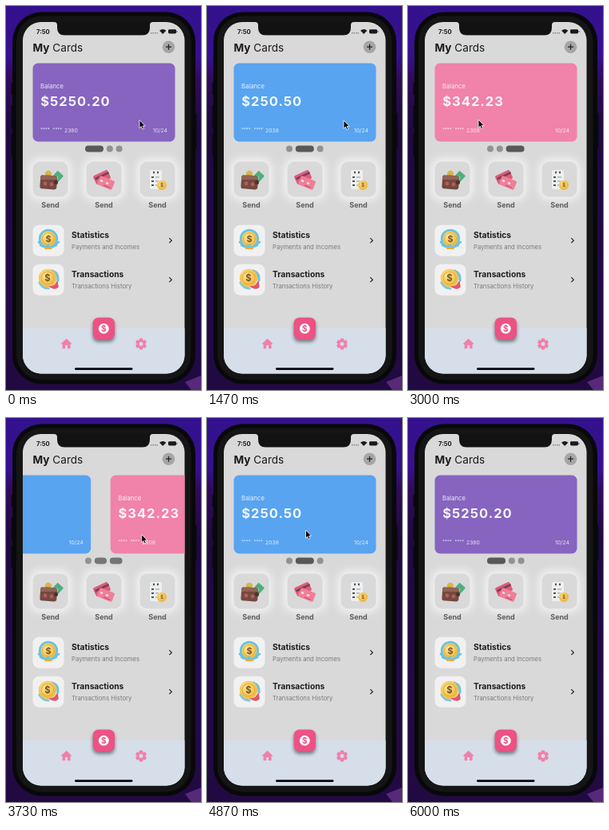
These frames come from a looping animation (244x480 px, 6.34 s). An HTML page:

```html
<!DOCTYPE html>
<html lang="en">
<head>
<meta charset="utf-8">
<title>My Cards</title>
<style>
  html, body { margin: 0; width: 100%; height: 100%; overflow: hidden; background: #1f0a42; }
  svg { display: block; width: 100vw; height: 100vh; font-family: Inter, "Open Sans", sans-serif; }
  .b { font-weight: 700; }
  .sub { font-size: 7.75px; fill: #7b7b7d; }
  .item { font-size: 10.25px; font-weight: 700; fill: #1c1c1e; }
  .send { font-size: 9px; font-weight: 700; fill: #5f5f61; text-anchor: middle; }
  .card { fill: #fff; }
  .small { font-size: 6.8px; fill-opacity: .8; }
  .stars { font-size: 5.8px; }
  .sum { font-size: 16.5px; font-weight: 700; letter-spacing: 1px; fill-opacity: .93; }
</style>
</head>
<body>
<svg viewBox="0 0 244 480" preserveAspectRatio="none">
  <defs>
    <linearGradient id="wall" x2="0" y2="1">
      <stop offset="0" stop-color="#33118c"/><stop offset=".13" stop-color="#361090"/>
      <stop offset=".19" stop-color="#300b5a"/><stop offset=".32" stop-color="#1e0a40"/>
      <stop offset=".7" stop-color="#230a46"/><stop offset="1" stop-color="#210a42"/>
    </linearGradient>
    <radialGradient id="gold" cx=".4" cy=".35">
      <stop offset="0" stop-color="#fde695"/><stop offset="1" stop-color="#f1c04a"/>
    </radialGradient>
    <filter id="glow" x="-50%" y="-50%" width="200%" height="200%"><feGaussianBlur stdDeviation="5.5"/></filter>
    <filter id="soft" x="-50%" y="-50%" width="200%" height="200%"><feGaussianBlur stdDeviation="2"/></filter>
    <clipPath id="screen"><rect x="21" y="20" width="202.5" height="439.5" rx="23"/></clipPath>
    <g id="coin">
      <circle r="10" fill="url(#gold)"/>
      <circle r="7" fill="none" stroke="#e5ae3c" stroke-width=".9"/>
      <text class="b" y="3.6" font-size="10" text-anchor="middle" fill="#7a5428" stroke="none">$</text>
    </g>
  </defs>

  <rect width="244" height="480" fill="url(#wall)"/>
  <path d="M224 470L244 462V480H232z" fill="#58297a"/>
  <path d="M7.5 96v15M7.5 124v28M7.5 160v28M237.5 134v44" stroke="#0b0a10" stroke-width="2"/>
  <rect x="8" y="7.5" width="229" height="465" rx="37" fill="#08080a"/>
  <rect x="13" y="12.5" width="218.5" height="455" rx="32" fill="#151516"/>

  <g clip-path="url(#screen)">
    <rect x="21" y="20" width="203" height="441" fill="#d9d9da"/>

    <text x="33.5" y="56.5" font-size="13.6" fill="#1a1a1c"><tspan class="b">My</tspan> Cards</text>
    <circle cx="203.5" cy="51.2" r="7.8" fill="#a6a6a8"/>
    <path d="M200 51.2h7M203.5 47.7v7" stroke="#222" stroke-width="1.3"/>

    <g id="tiles"></g>
    <g id="cards"></g>
    <g id="dots"></g>

    <g transform="translate(55 217)">
      <rect x="-5" y="-8" width="10" height="15" rx="1" fill="#4fae80" transform="translate(8 -2) rotate(42)"/>
      <circle cx="8" cy="-2" r="2.4" fill="#8fd0a8"/>
      <circle cx="-2" cy="-7" r="4.2" fill="#d9b545"/>
      <rect x="-12" y="-5" width="21" height="17" rx="3" fill="#744a40" transform="rotate(4)"/>
      <path d="M-12-4Q-2-8 9-3v3H-12z" fill="#936456"/>
      <circle cx="-6" cy="5" r="2.4" fill="#b55d59"/>
      <circle cx="2" cy="6" r="2.4" fill="#b55d59"/>
      <rect x="5" y="1" width="5" height="5" rx="2" fill="#4f322c"/>
    </g>
    <g transform="translate(122 217)">
      <rect x="-10" y="-6" width="20" height="12" rx="2" fill="#de5c7c" transform="translate(-2 -3) rotate(-25)"/>
      <path d="M-11-2L6-10l1.2 2.6L-9.8.6z" fill="#7d4152"/>
      <rect x="-10" y="-6" width="20" height="12" rx="2" fill="#ee7f99" transform="translate(3 4) rotate(22)"/>
      <path d="M-4 1l3 1.2M3 4l3 1.2" stroke="#fbe3e8" stroke-width="2.4"/>
      <path d="M0 7l8 3.2" stroke="#c94b6c" stroke-width="1.2"/>
    </g>
    <g transform="translate(189 217)">
      <rect x="-9" y="-12" width="15" height="24" rx="2" fill="#eeeff0"/>
      <path d="M-5-9h2m3 0h2" stroke="#4b5258" stroke-width="2.6"/>
      <path d="M-7-3h3m-3 5h3m-3 5h3" stroke="#4a5a60" stroke-width="2.2"/>
      <path d="M-2-3h5m-5 5h4m-4 5h2" stroke="#8d959b" stroke-width="1.2"/>
      <use href="#coin" transform="translate(6 7) scale(.62)"/>
    </g>

    <rect x="33.5" y="273.7" width="39" height="39" rx="8" fill="#f1f1f2"/>
    <rect x="33.5" y="322.7" width="39" height="39" rx="8" fill="#f1f1f2"/>
    <g transform="translate(53 292)" fill="none" stroke="#6cc3e0" stroke-width="2.6" stroke-linecap="round">
      <path d="M-12 3l4 4M9 6l4-3"/>
      <use href="#coin" transform="translate(0 -1) scale(1.08)"/>
      <path d="M-10 7Q-4 11 0 7M5 9l5-2"/>
      <path d="M-4 11h8" stroke="#e8ae45" stroke-width="2"/>
    </g>
    <g transform="translate(53 341)" fill="none" stroke-width="3.2" stroke-linecap="round">
      <path d="M5-10Q13-7 12 2" stroke="#74bfe3"/>
      <path d="M-11 5Q-7 12 0 12" stroke="#7cc8e2"/>
      <use href="#coin" transform="translate(-1 -1) scale(1.12)"/>
      <path d="M2 10Q10 9 11 3L12 10Q8 14 2 10z" fill="#e0576a" stroke="#e0576a" stroke-width="1.5"/>
    </g>
    <text class="item" x="82" y="290.2">Statistics</text>
    <text class="sub" x="82" y="303.7">Payments and Incomes</text>
    <text class="item" x="82" y="339.2">Transactions</text>
    <text class="sub" x="82" y="352.7">Transactions History</text>
    <path d="M204.3 290.2l3 3-3 3M204.3 339.2l3 3-3 3" fill="none" stroke="#222" stroke-width="1.2"/>

    <rect x="21" y="403" width="203" height="58" fill="#d6deea"/>
    <rect x="108.5" y="392" width="27.5" height="28" rx="7" fill="#000" opacity=".45" filter="url(#soft)"/>
    <rect x="108.7" y="389.5" width="27.3" height="27.3" rx="7" fill="#ec5284"/>
    <circle cx="122.3" cy="403.2" r="6.4" fill="#fff"/>
    <text class="b" x="122.3" y="406.9" font-size="10" text-anchor="middle" fill="#ec5284">$</text>
    <path d="M75.6 415.8l7.2 6.6h-2.2v5.9h-3.6v-4.4h-2.8v4.4h-3.6v-5.9h-2.2z" fill="#f080aa"/>
    <g id="gear" transform="translate(169 422.5)" fill="#f080aa"></g>
    <rect x="86" y="452.3" width="72.5" height="2.6" rx="1.3" fill="#08080a"/>

    <path d="M60 19V20Q64 20 64 24V27Q64 36.5 73 36.5H171Q180 36.5 180 27V24Q180 20 184 20V19z" fill="#121213"/>
    <text class="b" x="38" y="34.8" font-size="7.7" fill="#1a1a1c">7:50</text>
    <path d="M181 33.8h9" stroke="#8a8a8c" stroke-width="1.4" stroke-dasharray="1.5 1"/>
    <path d="M192 30.8Q196.2 27.3 200.4 30.8L196.2 35z" fill="#1a1a1c"/>
    <rect x="203" y="29.3" width="10" height="5.2" rx="1.4" fill="#1a1a1c"/>
    <rect x="213.5" y="31" width="1" height="2" fill="#555"/>
  </g>
  <path id="pointer" d="M0 0V10.2L2.3 8.1 3.8 11.6 5.6 10.8 4.1 7.4H7.2z" fill="#000" stroke="#fff" stroke-width=".8" stroke-linejoin="round"/>
</svg>

<script>
const LOOP = 6340, FRAME = 1000 / 15, PITCH = 202.5;
const $ = id => document.getElementById(id);

const accounts = [
  { color: '#8664c0', sum: '$5250.20', last: '2380' },
  { color: '#58a4f1', sum: '$250.50', last: '2038' },
  { color: '#f182a9', sum: '$342.23', last: '2308' }
];

$('cards').innerHTML = accounts.map((a, i) => `
  <g class="card" transform="translate(${i * PITCH})">
    <rect x="33.5" y="71.5" width="178" height="98" rx="6.5" fill="${a.color}"/>
    <text x="43" y="102.7" font-size="7.7" fill-opacity=".85">Balance</text>
    <text class="sum" x="43.3" y="124.7">${a.sum}</text>
    <g class="small">
      <text class="stars" x="43" y="157.4">****</text>
      <text class="stars" x="58.5" y="157.4">****</text>
      <text x="73" y="158">${a.last}</text>
      <text x="202" y="158" text-anchor="end">10/24</text>
    </g>
  </g>`).join('');

const tileXs = [33.5, 100.5, 167.5];
const tile = (x, extra) => `<rect x="${x}" y="194.5" width="44" height="44" rx="9" ${extra}/>`;
$('tiles').innerHTML =
  tileXs.map(x => `<rect x="${x - 4}" y="190.5" width="52" height="52" rx="13" fill="#fff" opacity=".7" filter="url(#glow)"/>`).join('') +
  tileXs.map(x => tile(x, 'fill="#d9d9da"') + `<text class="send" x="${x + 22}" y="252">Send</text>`).join('');

$('gear').innerHTML = [0, 60, 120].map(r =>
  `<rect x="-2.3" y="-7" width="4.6" height="14" rx="1" transform="rotate(${r})"/>`).join('') +
  '<circle r="5.3"/><circle r="2.4" fill="#d6deea"/>';

$('dots').innerHTML = accounts.map(() => '<rect y="174.5" height="8" rx="4"/>').join('');
const dots = [...$('dots').children];

const linear = u => u;
const push = u => u * u;
const settle = u => 1 - (1 - u) ** 3;
const smooth = u => u * u * (3 - 2 * u);

// Keys are [time, value, easing into the key].
function at(keys, t, ease) {
  const i = keys.findIndex(k => k[0] > t);
  if (i < 0) return keys[keys.length - 1][1];
  const [t0, v0] = keys[i - 1], [t1, v1, own = ease] = keys[i];
  return v0 + (v1 - v0) * own((t - t0) / (t1 - t0));
}

const swipe = (start, from, mid, to) =>
  [[start, from], [start + 250, mid, push], [start + 810, to, settle]];
const page = [
  [0, 0], ...swipe(230, 0, .45, 1), ...swipe(1950, 1, 1.437, 2),
  ...swipe(3483, 2, 1.521, 1), ...swipe(5000, 1, .52, 0)
];
const pointerX = [
  [0, 167], [200, 170], [480, 64, push], [650, 48, settle], [850, 54], [1400, 171], [1930, 171],
  [2200, 63.5, push], [2350, 46, settle], [2550, 52], [2950, 88], [3130, 88], [3460, 63],
  [3733, 169.5, push], [3870, 188, settle], [4100, 182], [4700, 123.5], [4870, 123.5],
  [4980, 98], [5250, 206, push], [5400, 252, linear]
];
const pointerY = [[0, 142.5], [1467, 143], [2200, 142], [3000, 142], [3733, 145.5], [4867, 140], [5400, 150]];

function draw(t) {
  const p = at(page, t, linear);
  $('cards').setAttribute('transform', `translate(${-p * PITCH})`);

  let x = 99;
  dots.forEach((dot, i) => {
    const on = Math.max(0, 1 - Math.abs(p - i));
    const width = 8 + 15 * on;
    const grey = 146 - 58 * on;
    dot.setAttribute('x', x);
    dot.setAttribute('width', width);
    dot.setAttribute('fill', `rgb(${grey},${grey},${grey + 2})`);
    x += width + 3.8;
  });

  $('pointer').setAttribute('transform', `translate(${at(pointerX, t, smooth)} ${at(pointerY, t, linear)})`);
}

function tick() {
  const t = performance.now() % LOOP;
  draw(Math.floor((t + 4) / FRAME) * FRAME);
  requestAnimationFrame(tick);
}
tick();
</script>
</body>
</html>
```
